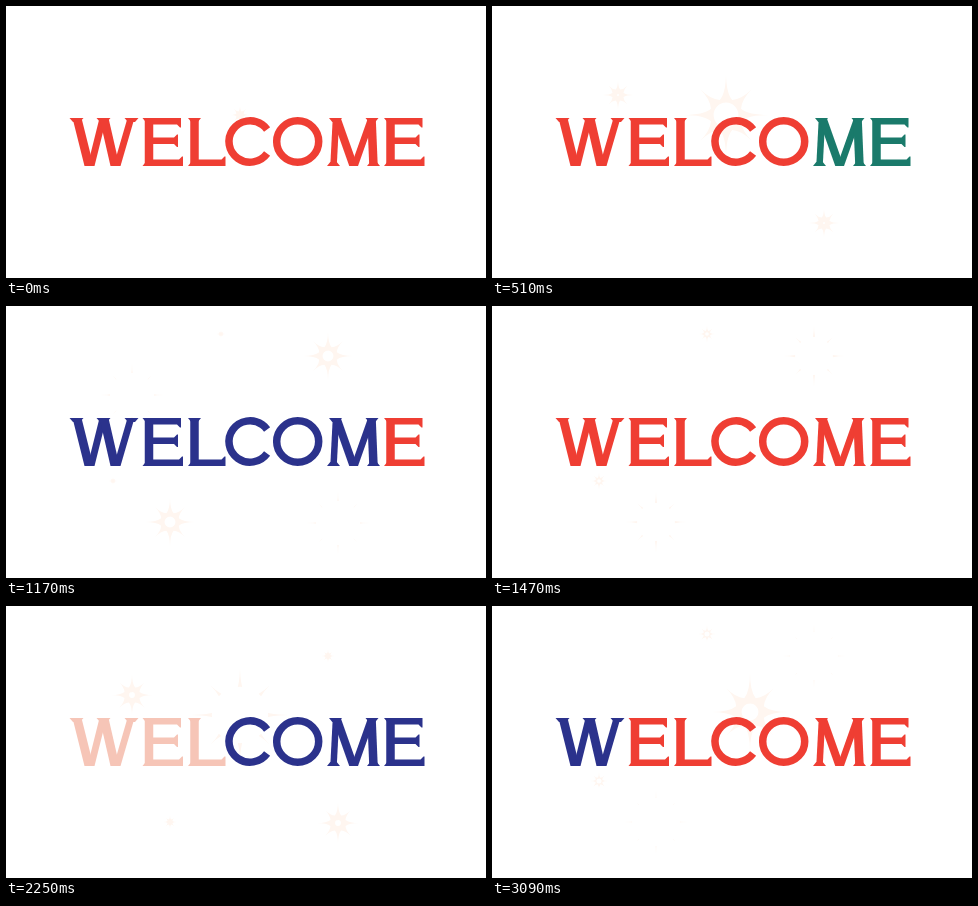
Write an HTML page with a canvas that moves like this. It is 480 px wide and 272 px high and loops after 3.15 s.

```html
<!DOCTYPE html>
<html lang="en">
<head>
<meta charset="utf-8">
<title>Welcome</title>
<style>
  html, body { margin: 0; width: 100%; height: 100%; overflow: hidden; background: #fff; }
  canvas { display: block; width: 480px; height: 272px; }
</style>
</head>
<body>
<canvas id="stage" width="480" height="272" role="img" aria-label="WELCOME"></canvas>
<script>
const ctx = document.getElementById('stage').getContext('2d');
const LOOP = 3150, TICK = 30, FIRST_WAVE = 405, STAR_CYCLE = 1560;
const TOP = 112, BASE = 160, MIDDLE = 135.5;
const RED = '#ef3e33', GREEN = '#1a7a6b', BLUE = '#2b328c', PINK = '#f6c5b7', GLOW = '#fff6f0';

// Waves follow one another; each recolours the word from the last letter to the first.
const waves = [
  { color: GREEN, gap: 55 }, { color: BLUE, gap: 53 }, { color: RED, gap: 47 },
  { color: PINK, gap: 47 }, { color: BLUE, gap: 117 }, { color: RED, gap: 84 }
];

const bigStar = { r: 54, life: 860 };
const midStar = { r: 34, life: 960 };
const dot = { r: 12, life: 760 };
const bursts = [
  { ...bigStar, x: 234, y: 109, at: -30 },
  { ...midStar, x: 126, y: 89, at: 310 },
  { ...midStar, x: 332, y: 217, at: 310 },
  { ...midStar, x: 322, y: 50, at: 650 },
  { ...midStar, x: 164, y: 216, at: 650 },
  { ...dot, x: 215, y: 28, at: 1070 },
  { ...dot, x: 107, y: 175, at: 1070 },
  { ...bigStar, x: 258, y: 106, at: 2630 }
];

// A stroke from top to base, cut level at both ends.
function leg(top, base, w) {
  ctx.beginPath();
  ctx.moveTo(top - w / 2, TOP);
  ctx.lineTo(top + w / 2, TOP);
  ctx.lineTo(base + w / 2, BASE);
  ctx.lineTo(base - w / 2, BASE);
  ctx.fill();
}

// A thin foot that tapers into its stroke; dir points into the letter.
function serif(x, y, w, dir) {
  ctx.beginPath();
  ctx.moveTo(x - w / 2, y);
  ctx.lineTo(x + w / 2, y);
  ctx.lineTo(x + w / 4, y + dir * 4);
  ctx.lineTo(x - w / 4, y + dir * 4);
  ctx.fill();
}

// A level arm whose end flares by the given amounts.
function arm(x, y, w, up, down) {
  const h = 6.5;
  ctx.beginPath();
  ctx.moveTo(x, y);
  ctx.lineTo(x + w - 4, y);
  ctx.lineTo(x + w - 1, y - up);
  ctx.lineTo(x + w, y - up);
  ctx.lineTo(x + w, y + h + down);
  ctx.lineTo(x + w - 1, y + h + down);
  ctx.lineTo(x + w - 4, y + h);
  ctx.lineTo(x, y + h);
  ctx.fill();
}

function stem(x) {
  leg(x, x, 8.5);
  serif(x, TOP, 13, 1);
  serif(x, BASE, 13, -1);
}

function letterE(x) {
  stem(x + 6);
  arm(x + 6, TOP, 32, 0, 3);
  arm(x + 6, 131.5, 29, 3, 3);
  arm(x + 6, BASE - 6.5, 34, 3, 0);
}

function letterL(x) {
  stem(x + 6);
  arm(x + 6, BASE - 6.5, 31, 3, 0);
}

function letterW(x) {
  leg(x + 8, x + 20, 9);
  leg(x + 34, x + 22, 7);
  leg(x + 35, x + 46, 9);
  leg(x + 62, x + 48, 7);
  for (const d of [7.5, 34.5, 62.5]) serif(x + d, TOP, 14, 1);
}

function letterM(x) {
  leg(x + 8.5, x + 6, 6.5);
  leg(x + 9, x + 26, 8.5);
  leg(x + 44, x + 27, 7);
  leg(x + 44, x + 46, 8.5);
  for (const d of [8, 44.5]) serif(x + d, TOP, 13, 1);
  for (const d of [6, 46]) serif(x + d, BASE, 13, -1);
}

function ring(x, gap) {
  ctx.lineWidth = 7.5;
  ctx.beginPath();
  ctx.ellipse(x, MIDDLE, 21, 20.7, 0, gap, Math.PI * 2 - gap);
  ctx.stroke();
}

const word = [
  () => letterW(63),
  () => letterE(137),
  () => letterL(182.5),
  () => ring(244, 0.62),
  () => ring(291.7, 0),
  () => letterM(321.5),
  () => letterE(378.5)
];

// Needle rays grow outward while a hole eats the star from its centre.
function drawBurst(b, age) {
  const k = age / b.life;
  if (k <= 0 || k >= 1) return;
  const outer = b.r * Math.sqrt(k);
  const hole = outer * (0.3 * k + 0.65 * k ** 4);
  const point = (r, a) => [r * Math.cos(a), r * Math.sin(a)];
  ctx.save();
  ctx.translate(b.x, b.y);
  ctx.beginPath();
  ctx.rect(-80, -80, 160, 160);
  ctx.arc(0, 0, hole, 0, Math.PI * 2);
  ctx.clip('evenodd');
  ctx.beginPath();
  for (let i = 0; i < 8; i++) {
    const a = i * Math.PI / 4, bend = point(outer * 0.52, a);
    ctx.lineTo(...point(outer * 0.38, a - Math.PI / 8));
    ctx.quadraticCurveTo(...bend, ...point(outer * (i % 2 ? 0.85 : 1), a));
    ctx.quadraticCurveTo(...bend, ...point(outer * 0.38, a + Math.PI / 8));
  }
  ctx.fillStyle = GLOW;
  ctx.fill();
  ctx.restore();
}

function letterColor(index, t) {
  let color = RED, start = FIRST_WAVE;
  for (const w of waves) {
    if (t >= start + (word.length - 1 - index) * w.gap) color = w.color;
    start += word.length * w.gap;
  }
  return color;
}

function draw(t) {
  ctx.fillStyle = '#fff';
  ctx.fillRect(0, 0, 480, 272);
  for (const b of bursts) {
    drawBurst(b, t - b.at);
    drawBurst(b, t - b.at - STAR_CYCLE);
  }
  word.forEach((paint, i) => {
    ctx.fillStyle = ctx.strokeStyle = letterColor(i, t);
    paint();
  });
}

const origin = performance.now();
function frame() {
  const t = (performance.now() - origin) % LOOP;
  draw(Math.floor(t / TICK) * TICK);
  requestAnimationFrame(frame);
}
frame();
</script>
</body>
</html>
```
